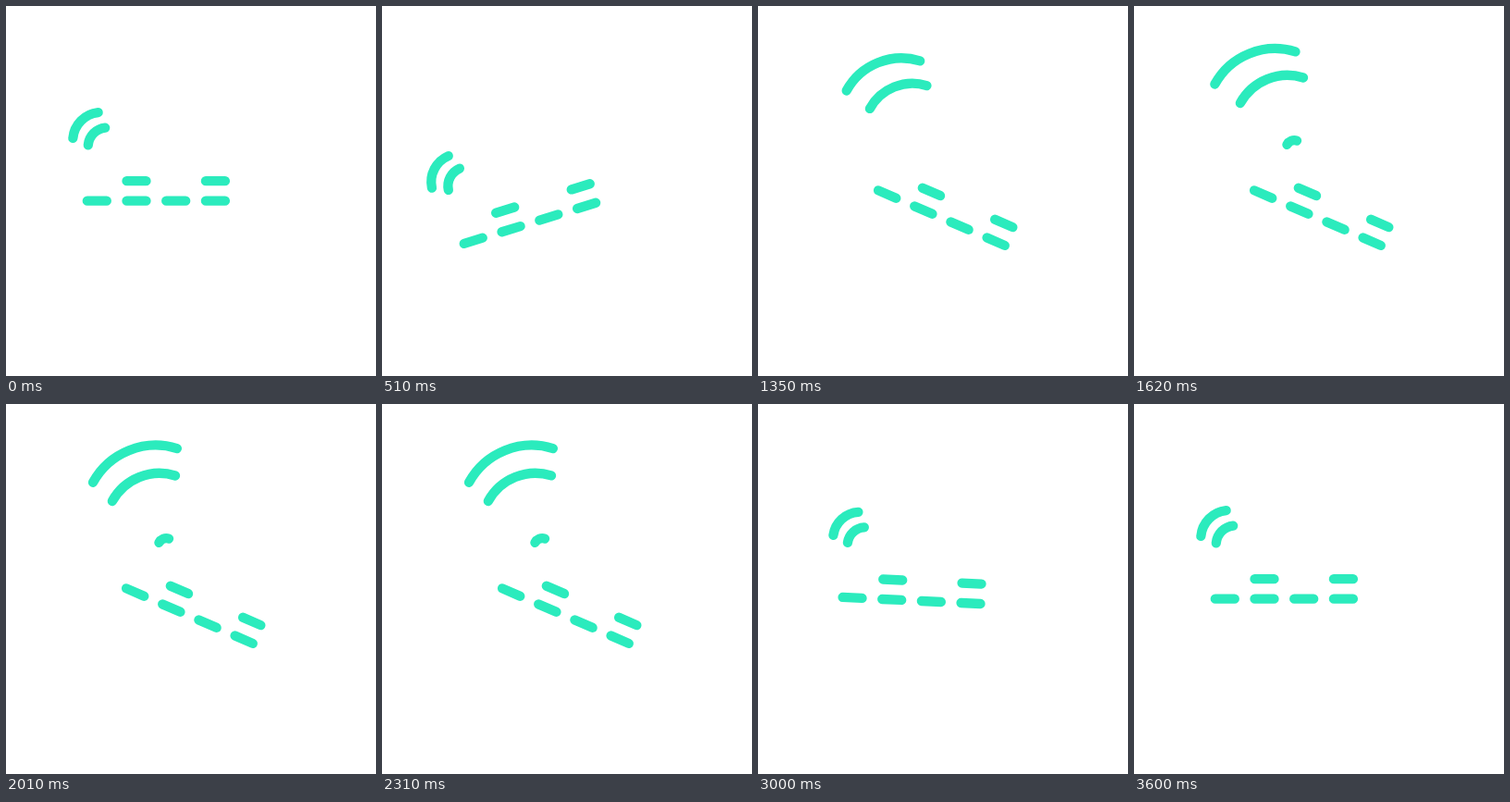
Animation, 400 px wide and 400 px high, one loop 5.63 s. Source, as an HTML page:

```html
<!DOCTYPE html>
<html lang="en">
<head>
<meta charset="utf-8">
<title>Signal</title>
<style>
  html, body { margin: 0; width: 100%; height: 100%; overflow: hidden; background: #fff; }
  svg { display: block; width: 100%; height: 100%; }
  path { fill: none; stroke: #2bebbd; stroke-width: 10.3; stroke-linecap: round; }
</style>
</head>
<body>
<svg viewBox="0 0 400 400">
  <path id="dashes"></path>
  <g id="waves"></g>
</svg>
<script>
const LOOP = 5630;
const SWING_BACK = 2445;

const smooth = s => s * s * (3 - 2 * s);
const easeOut = s => s * (2 - s);
const move = (start, end, to, ease = smooth) => ({ start, end, to, ease });

// Carries a state through its moves up to time t.
function follow(state, moves, t) {
  for (const { start, end, to, ease } of moves) {
    const s = Math.min(Math.max((t - start) / (end - start), 0), 1);
    state = state.map((v, i) => v + (to[i] - v) * ease(s));
  }
  return state;
}

// Body poses: pivot x, pivot y, angle.
const LEVEL = [222.5, 241, 0];
const TILTED = [226.6, 246.3, -18.3];
const RAISED = [241.5, 280.9, 23.5];
const BODY_MOVES = [
  move(0, 600, TILTED),
  move(600, 1295, RAISED),
  move(SWING_BACK, 3150, LEVEL)
];

// Wave states: middle x, middle y, chord, relative to the level body.
const DOT = [109, 163, 4];
const SEED = [104.5, 147.1, 11.5];
const INNER = [98, 141, 26.2];
const OUTER = [86, 129, 38.9];
const NEAR = [62, 104, 73.5];
const SIDE = [35.8, 88.9, 94];
const FAR = [43.4, 85, 98];

// Loose waves stay behind when the body swings back.
const WAVES = [
  { from: 0, to: 2340, loose: true, state: OUTER,
    moves: [move(1045, 1450, SIDE), move(1620, 2010, FAR)] },
  { from: 0, to: 2895, loose: true, state: INNER,
    moves: [move(1045, 1450, NEAR), move(2300, 2740, FAR)] },
  { from: 1560, to: 2450, state: SEED, moves: [] },
  { from: 2450, to: LOOP, state: DOT, moves: [move(2450, 3180, OUTER, easeOut)] },
  { from: 2550, to: LOOP, state: DOT, moves: [move(2550, 3180, INNER, easeOut)] }
];

function bodyTransform(t) {
  const [x, y, angle] = follow(LEVEL, BODY_MOVES, t);
  return `translate(${x} ${y}) rotate(${angle}) translate(${-LEVEL[0]} ${-LEVEL[1]})`;
}

const dashes = document.getElementById("dashes");
const dash = (col, y) => `M${87.8 + 42.7 * col} ${y}h21`;
dashes.setAttribute("d",
  [0, 1, 2, 3].map(col => dash(col, 210.7)).join("") + dash(1, 189.2) + dash(3, 189.2));

const holder = document.getElementById("waves");
for (const wave of WAVES) {
  wave.path = document.createElementNS("http://www.w3.org/2000/svg", "path");
  holder.appendChild(wave.path);
}

function draw(t) {
  const body = bodyTransform(t);
  const parked = bodyTransform(Math.min(t, SWING_BACK));
  dashes.setAttribute("transform", body);
  for (const { path, from, to, loose, state, moves } of WAVES) {
    const shown = t >= from && t < to;
    path.style.display = shown ? "" : "none";
    if (!shown) continue;
    const [x, y, chord] = follow(state, moves, t);
    const r = chord * 0.79;
    path.setAttribute("d", `M${-chord / 2} 0A${r} ${r} 0 0 1 ${chord / 2} 0`);
    path.setAttribute("transform", `${loose ? parked : body} translate(${x} ${y}) rotate(-45.5)`);
  }
}

const start = performance.now();
function tick() {
  draw((performance.now() - start) % LOOP);
  requestAnimationFrame(tick);
}
tick();
</script>
</body>
</html>
```
